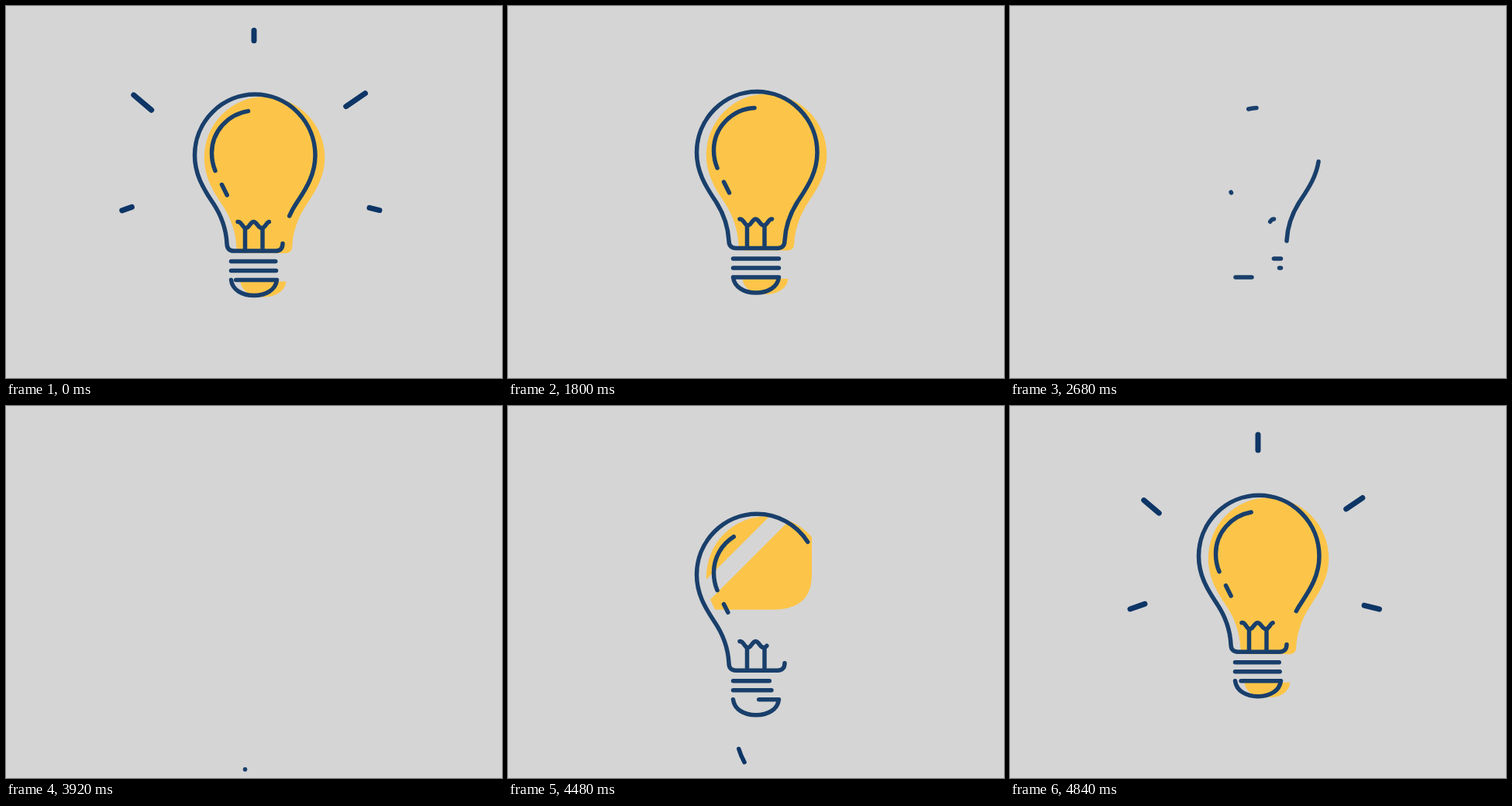
An HTML page that plays this animation: 640x480 px, repeating every 4880 ms.

```html
<!DOCTYPE html>
<html lang="en">
<head>
<meta charset="utf-8">
<title>Light bulb</title>
<style>
  html, body { margin: 0; width: 100%; height: 100%; overflow: hidden; background: #d5d5d5; }
  svg { display: block; width: 100vw; height: 100vh; }
  path { stroke-linecap: round; stroke-linejoin: round; }
  #lines path { fill: none; stroke: #193f6b; stroke-width: 5.5; }
  #accents path { fill: none; stroke: #0d3566; stroke-width: 7; }
  #fill { fill: #fcc549; }
</style>
</head>
<body>
<svg viewBox="0 0 640 480">
  <defs><clipPath id="reveal"><path id="wipe"/></clipPath></defs>
  <g id="accents"></g>
  <g id="bulb">
    <g id="fill" clip-path="url(#reveal)"></g>
    <g id="lines"></g>
  </g>
</svg>
<script>
const LOOP = 4880, STEP = 40;
const OUT_START = 1800, OUT_END = 2960, IN_START = 3920, IN_END = 5360;

const $ = id => document.getElementById(id);
const clamp = (v, lo = 0, hi = 1) => Math.min(hi, Math.max(lo, v));

function addPath(parent, d, attrs = {}) {
  const el = document.createElementNS('http://www.w3.org/2000/svg', 'path');
  el.setAttribute('d', d);
  for (const key in attrs) el.setAttribute(key, attrs[key]);
  return parent.appendChild(el);
}

const addStroke = (parent, d, attrs) => addPath(parent, d, { pathLength: 1, ...attrs });

// Show only the part of a stroke between two fractions of its length.
function trim(el, from, to) {
  const len = to - from;
  el.style.display = len > 0 ? '' : 'none';
  el.style.strokeDasharray = `${Math.max(len, 0)} 2`;
  el.style.strokeDashoffset = -from;
}

const glass = 'M357 303C357 309 354 312.5 348 312.5H294C288 312.5 285 309 285 303' +
  'C284 284 277 265 266 249C254 231 243.5 213 243.5 189A77.75 78.5 0 0 1 399 189' +
  'C399 213 388 231 376 249C365 265 358 284 357 303';
const cap = 'M290.5 350C292 363 305 370 320 370S348 363 349.5 350H291';

addPath($('fill'), glass, { transform: 'translate(12.3 3)' });
addPath($('fill'), cap, { transform: 'translate(12 2)' });

// path, draw-in easing power, erase speed, shortest drawn part
const lines = [
  [glass, 2.5, 1],
  ['M270 209C267 202 265.5 194 265.5 186C265.5 157 289 133 318 131.5', 2.7, 1.12],
  ['M278.5 227L285.5 241', 2.9, 1.17],
  ['M299 275C304 274 305 283 309.5 283S315 275 319.5 275S325 283 330 283S336 274 340.5 275', 3.6, 1.1],
  ['M308.5 312V284', 8, 1.25, 0.01],
  ['M331 284V312', 8, 1.25],
  ['M290.5 326H349.5', 3.2, 1.05],
  ['M290.5 338H349.5', 3.7, 1.2],
  [cap, 2.9, 1.05]
].map(([d, power, speed, min = 0]) => ({ el: addStroke($('lines'), d), power, speed, min }));

const trail = addStroke($('accents'), 'M322 484C314 474 303 460 297.8 442.5', { style: 'stroke-width:5.5' });

// outer end x, y, inward direction x, y, length, head and tail distances, delay
const rays = [
  [320, 20, 0, 1, 55, 17, 37, 0],
  [139, 267.6, 20, -7, 55, 17, 37, 0],
  [493, 266.3, -20, -5, 55, 17, 37, 0],
  [145, 98, 20, 17, 62, 26, 56, 40],
  [485, 98, -22, 15, 62, 26, 56, 40]
].map(([x, y, dx, dy, len, head, tail, delay]) => {
  const k = len / Math.hypot(dx, dy);
  const el = addStroke($('accents'), `M${x} ${y}l${dx * k} ${dy * k}`);
  return { el, len, head, tail, delay };
});

// Two diagonal areas that grow together from the upper left.
function drawWipe(t) {
  const f = (Math.max(0, IN_END - t) / 880) ** 4;
  const a = clamp(451 + (t - 4480) * 0.44, 0, 484), b = 482;
  const right = 450 - 58 * f, bottom = 390 - 156 * f;
  let d = `M0 0H${a}L0 ${a}Z`;
  if (bottom > 150) {
    d += `M${right} ${b - right}V${bottom - 45}Q${right} ${bottom} ${right - 50} ${bottom}H${b - bottom}Z`;
  }
  return d;
}

function eraseWipe(p) {
  const c = 375 + 360 * p;
  return `M${c} 0H900V900H0V${c}Z`;
}

function drawBulb(t) {
  const left = clamp((IN_END - t) / (IN_END - IN_START));
  for (const { el, power, min } of lines) trim(el, 0, Math.max(min, 1 - left ** power));
  $('bulb').setAttribute('transform', `translate(0 ${157 * left ** 3.45})`);
  $('wipe').setAttribute('d', drawWipe(t));
}

function eraseBulb(t) {
  const x = clamp((t - OUT_START) / (OUT_END - OUT_START));
  const p = (x + x * x * (3 - 2 * x)) / 2;
  for (const { el, speed } of lines) trim(el, clamp(p * speed), 1);
  $('bulb').setAttribute('transform', 'translate(0 0)');
  $('wipe').setAttribute('d', eraseWipe(clamp((t - OUT_START) / 520)));
}

function drawRays(t) {
  for (const { el, len, head, tail, delay } of rays) {
    const u = (Math.max(0, 5080 + delay - t) / 240) ** 2.2;
    trim(el, clamp(head * u / len), clamp(tail * u / len));
  }
}

function render(now) {
  let t = Math.floor((now % LOOP) / STEP) * STEP;
  if (t < 1000) t += LOOP;
  if (t < IN_START) eraseBulb(t); else drawBulb(t);
  trim(trail, clamp((t - 4335) / 235), clamp((t - 4240) / 95));
  drawRays(t < IN_START ? IN_END : t);
}

const start = performance.now();
function tick() {
  render(performance.now() - start);
  requestAnimationFrame(tick);
}
tick();
</script>
</body>
</html>
```
